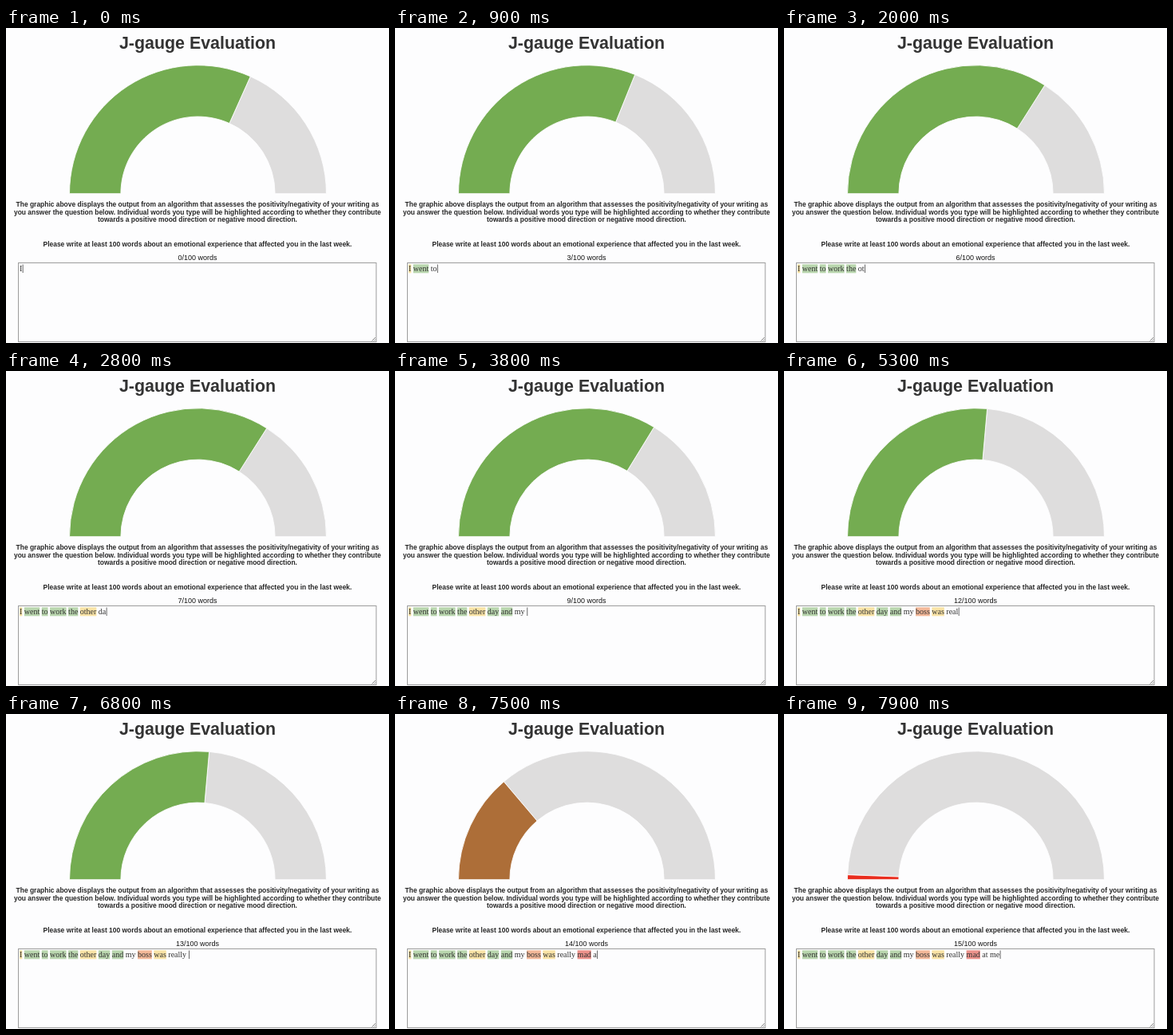
Write an HTML page that moves like this. It is 480x395 px and loops after 8 s.

```html
<!DOCTYPE html>
<html lang="en">
<head>
<meta charset="utf-8">
<title>J-gauge Evaluation</title>
<style>
  html, body { margin: 0; width: 100%; height: 100%; overflow: hidden; background: #fdfdfe; }
  svg { display: block; width: 100vw; height: 100vh; }
  .sans { font-family: "Liberation Sans", Arial, sans-serif; fill: #262626; text-anchor: middle; }
  .title { font-size: 21.4px; font-weight: bold; fill: #333; }
  .copy { font-size: 8.45px; font-weight: bold; }
  .count { font-size: 9px; fill: #111; }
  .typed { font: 10px "Liberation Serif", "Times New Roman", serif; fill: #333; white-space: pre; }
  .arc { stroke: #fdfdfe; stroke-width: .9px; }
</style>
</head>
<body>
<svg viewBox="0 0 480 395">
  <text class="sans title" x="240" y="25.8">J-gauge Evaluation</text>
  <path id="rest" class="arc" fill="#dedddd"/>
  <path id="level" class="arc"/>
  <g class="sans copy">
    <text x="240" y="224.2">The graphic above displays the output from an algorithm that assesses the positivity/negativity of your writing as</text>
    <text x="240" y="233.6">you answer the question below. Individual words you type will be highlighted according to whether they contribute</text>
    <text x="240" y="243">towards a positive mood direction or negative mood direction.</text>
    <text x="240" y="274.2">Please write at least 100 words about an emotional experience that affected you in the last week.</text>
  </g>
  <text id="count" class="sans count" x="240" y="291.2"></text>
  <rect x="15.5" y="294.5" width="448.5" height="99" fill="#fdfdfe" stroke="#9c9c9c"/>
  <path d="M458.5 392.5l4.5-4.5M461 392.5l2-2" stroke="#666" stroke-width=".8"/>
  <g id="marks"></g>
  <text id="typed" class="typed" x="17" y="305"></text>
  <rect id="caret" y="296.5" width=".8" height="10.5" fill="#444"/>
</svg>
<script>
const LOOP = 8000, STEP = 100, LEFT = 17;
const TEXT = "I went to work the other day and my boss was really mad at me";
const TINT = { g: "#b9d6ae", y: "#f9e3a6", o: "#f3b899", r: "#ec928b" };
const MOODS = "yggggygg-oy-r--";

// [time, characters typed]
const TYPING = [[-100, 0], [0, 1], [900, 9], [2000, 21], [3800, 36], [5400, 50],
  [5600, 52], [6900, 52], [7300, 56], [7400, 56], [7900, 61]];
// [time, share of the half ring, eased]
const LEVELS = [[0, .634], [600, .612], [900, .622], [1400, .645], [1800, .671],
  [2000, .68], [2500, .7], [2800, .68], [3000, .662], [3800, .675], [4400, .681],
  [4500, .672], [5300, .528, true], [7400, .528], [7900, .012, true]];
const GREEN = [116, 172, 81], RED = [233, 45, 30];

const el = id => document.getElementById(id);
const pen = document.createElement("canvas").getContext("2d");
const easeOut = p => 1 - (1 - p) ** 3;

function widthOf(s) {
  pen.font = '100px "Liberation Serif", "Times New Roman", serif';
  return pen.measureText(s).width / 10;
}

function sample(keys, t) {
  const i = keys.findIndex(k => k[0] > t);
  if (i < 0) return keys[keys.length - 1][1];
  if (i === 0) return keys[0][1];
  const [t0, v0] = keys[i - 1], [t1, v1, eased] = keys[i];
  const p = (t - t0) / (t1 - t0);
  return v0 + (v1 - v0) * (eased ? easeOut(p) : p);
}

const typedAt = t => TEXT.slice(0, Math.floor(sample(TYPING, t) + 1e-6));

function ring(from, to) {
  const cx = 240.5, cy = 207.7, outer = 161, inner = outer * .6;
  const at = (r, v) => {
    const a = Math.PI * (1 - v);
    return `${cx + r * Math.cos(a)} ${cy - r * Math.sin(a)}`;
  };
  return `M${at(outer, from)}A${outer} ${outer} 0 0 1 ${at(outer, to)}` +
    `L${at(inner, to)}A${inner} ${inner} 0 0 0 ${at(inner, from)}Z`;
}

// One highlight per word, shown once the word is finished
let pos = 0;
const marks = TEXT.split(" ").map((word, i) => {
  const rect = document.createElementNS("http://www.w3.org/2000/svg", "rect");
  const attrs = { x: LEFT + widthOf(TEXT.slice(0, pos)), y: 296.3, width: widthOf(word),
    height: 11, fill: TINT[MOODS[i]] || "none" };
  for (const k in attrs) rect.setAttribute(k, attrs[k]);
  el("marks").append(rect);
  pos += word.length + 1;
  return { rect, end: pos };
});

function caretAlpha(t) {
  if (t < 6000 || t >= 6600) return 1;
  return t < 6100 || t >= 6500 ? .5 : 0;
}

function draw(time) {
  const t = Math.floor(time / STEP) * STEP;
  const now = typedAt(t), seen = typedAt(t - STEP);
  const v = sample(LEVELS, t);
  const fall = t > 7400 ? (.528 - v) / .516 : 0;
  const color = GREEN.map((c, i) => Math.round(c + (RED[i] - c) * fall));

  el("rest").setAttribute("d", ring(v, 1));
  el("level").setAttribute("d", ring(0, v));
  el("level").setAttribute("fill", `rgb(${color})`);
  el("typed").textContent = now;
  el("count").textContent = `${seen ? seen.split(" ").length : 0}/100 words`;
  marks.forEach(m => m.rect.setAttribute("visibility", seen.length >= m.end ? "visible" : "hidden"));
  el("caret").setAttribute("x", LEFT + widthOf(now) + .4);
  el("caret").setAttribute("opacity", caretAlpha(t));
}

const start = performance.now();
function tick() {
  draw((performance.now() - start) % LOOP);
  requestAnimationFrame(tick);
}
tick();
</script>
</body>
</html>
```
